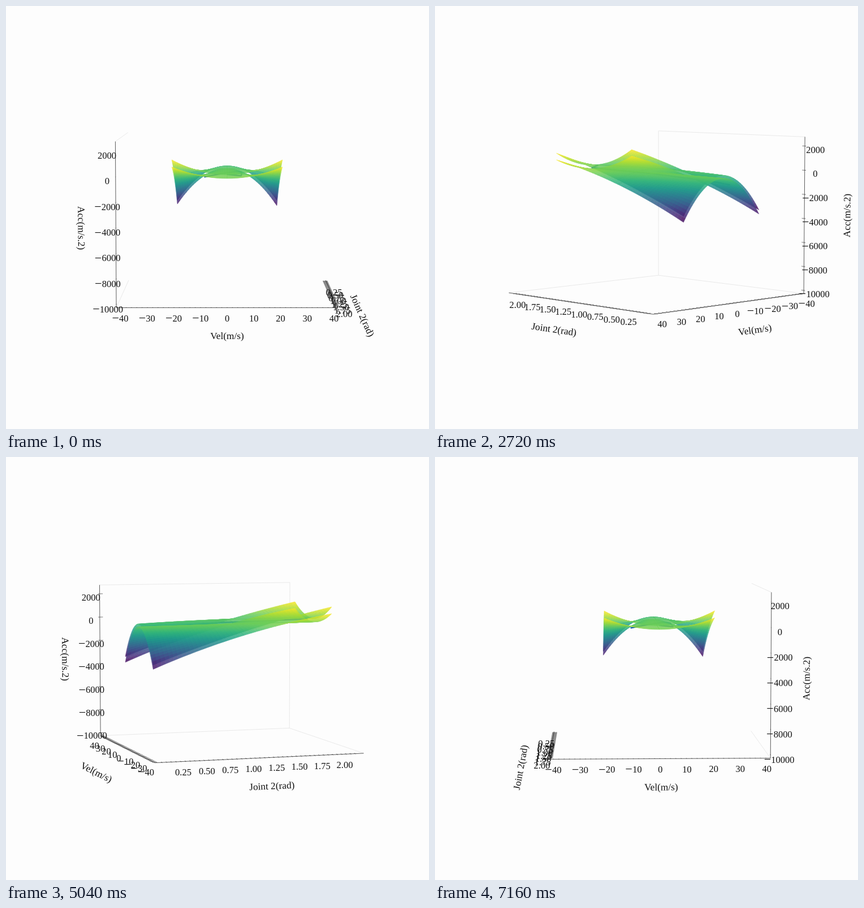
Animation of 748x748 px, one loop 7200 ms. Source, as an HTML page with a canvas:

```html
<!DOCTYPE html>
<html lang="en">
<head>
<meta charset="utf-8">
<title>Rotating acceleration surface</title>
<style>
  html, body { margin: 0; width: 100%; height: 100%; overflow: hidden; background: #fdfdfd; }
  canvas { display: block; width: 748px; height: 748px; }
</style>
</head>
<body>
<canvas id="stage" width="748" height="748"></canvas>
<script>
const SIZE = 748, STEP_MS = 40, STEPS = 180;
const BOX = 0.5952, BOX_Z = 0.4464;          // half sizes of the axes box
const V_MAX = 20.8, J_MIN = 0.12, J_MAX = 2.1;
const FONT = '"Liberation Serif", "Noto Serif", serif';
const stage = document.getElementById('stage').getContext('2d');
const layer = document.createElement('canvas');
layer.width = layer.height = SIZE;
const patchCtx = layer.getContext('2d');

// Data to box coordinates
const joint = q => (q - 1.11) / 2.18 * 1.1429;
const vel = v => v / 80 * 1.1429;
const acc = a => (a + 3750) / 12500 * 0.8571;

// Camera orbiting at 5 degrees elevation
const ELEV = Math.PI / 36, sinE = Math.sin(ELEV), cosE = Math.cos(ELEV);
let sinA = 0, cosA = 1;
function project([x, y, z]) {
  const toward = cosA * x + sinA * y;
  const depth = 10 - cosE * toward - sinE * z;
  const k = 3110 / depth;
  return [391 + k * (cosA * y - sinA * x), 370 - k * (cosE * z - sinE * toward), depth];
}

function line(points, color, width) {
  stage.beginPath();
  for (const p of points) {
    const [x, y] = project(p);
    stage.lineTo(x, y);
  }
  stage.strokeStyle = color;
  stage.lineWidth = width;
  stage.stroke();
}

// Upper and lower acceleration limits
const part = q => (q - J_MIN) / (J_MAX - J_MIN);
const bend = (q, slope, curve) => -6.92 + (q - J_MIN) * (slope - curve * (q - 1.47));
function upper(q, v) {
  const p = part(q);
  return -100 + p * (705 - 495 * p) + bend(q, 5.126, 0.44) * v * v;
}
function lower(q, v) {
  const rest = 1 - part(q);
  return -190 - 140 * rest + bend(q, 5.126, 0.92) * (1 + 0.058 * rest) * v * v - 70 * rest * v / V_MAX;
}

const viridis = ['440154', '482878', '3e4989', '31688e', '26828e',
                 '1f9e89', '35b779', '6ece58', 'b5de2b', 'fde725']
  .map(h => [0, 2, 4].map(i => parseInt(h.substr(i, 2), 16)));
function shade(t) {
  const s = Math.min(Math.max(t, 0), 0.9999) * 9, i = Math.floor(s);
  return 'rgb(' + viridis[i].map((c, n) => Math.round(c + (viridis[i + 1][n] - c) * (s - i))) + ')';
}

// A sheet is split into four patches so that near parts cover far ones translucently
function makeSheet(f) {
  const n = 44, points = [], patches = [[], [], [], []];
  for (let i = 0; i <= n; i++) {
    for (let j = 0; j <= n; j++) {
      const q = J_MIN + (J_MAX - J_MIN) * i / n, v = V_MAX * (2 * j / n - 1);
      points.push([joint(q), vel(v), acc(f(q, v))]);
    }
  }
  const heights = points.map(p => p[2]);
  const low = Math.min(...heights), high = Math.max(...heights);
  for (let i = 0; i < n; i++) {
    for (let j = 0; j < n; j++) {
      const a = i * (n + 1) + j, ids = [a, a + 1, a + n + 2, a + n + 1];
      const mean = ids.reduce((sum, id) => sum + heights[id], 0) / 4;
      patches[(i < n / 2 ? 0 : 2) + (j < n / 2 ? 0 : 1)]
        .push({ ids, color: shade((mean - low) / (high - low)), depth: 0 });
    }
  }
  return { points, patches };
}
const sheets = [makeSheet(upper), makeSheet(lower)];

function drawPatch(cells, flat) {
  patchCtx.clearRect(0, 0, SIZE, SIZE);
  patchCtx.lineWidth = 0.6;
  for (const c of cells) {
    patchCtx.beginPath();
    for (const id of c.ids) patchCtx.lineTo(flat[id][0], flat[id][1]);
    patchCtx.closePath();
    patchCtx.fillStyle = patchCtx.strokeStyle = c.color;
    patchCtx.fill();
    patchCtx.stroke();
  }
  stage.globalAlpha = 0.85;
  stage.drawImage(layer, 0, 0);
  stage.globalAlpha = 1;
}

function drawSheet({ points, patches }) {
  const flat = points.map(project);
  for (const cells of patches) {
    for (const c of cells) c.depth = c.ids.reduce((sum, id) => sum + flat[id][2], 0);
    cells.sort((a, b) => b.depth - a.depth);
  }
  patches.sort((a, b) => b[0].depth - a[0].depth);
  for (const cells of patches) drawPatch(cells, flat);
}

const track = [[0.49, 0, 100], [0.46, 0.075, -40], [0.25, 0.08, -120], [0, 0.08, -180],
               [-0.25, 0.07, -350], [-0.45, 0.06, -512], [-0.45, -0.04, -730], [-0.45, -0.136, -994]]
  .map(([x, y, a]) => [x, y, acc(a)]);

function range(from, to, step) {
  const out = [];
  for (let i = 0; from + i * step <= to + 1e-9; i++) out.push(from + i * step);
  return out;
}

// along: axis index; tickDir: index of the tick direction
const axes = [
  { along: 0, tickDir: 1, map: joint, name: 'Joint 2(rad)', digits: 2,
    labels: range(0.25, 2, 0.25), ticks: range(0.05, 2.15, 0.05) },
  { along: 1, tickDir: 0, map: vel, name: 'Vel(m/s)', digits: 0,
    labels: range(-40, 40, 10), ticks: range(-40, 40, 2) },
  { along: 2, tickDir: 0, map: acc, name: 'Acc(m/s.2)', digits: 0,
    labels: range(-10000, 2000, 2000), ticks: range(-10000, 2000, 2000) }
];
const half = [BOX, BOX, BOX_Z];

function drawNumber(value, digits, x, y) {
  const text = Math.abs(value).toFixed(digits);
  stage.font = '16.5px ' + FONT;
  const width = stage.measureText(text).width, sign = value < 0 ? 12.6 : 0;
  const left = x - (width + sign) / 2;
  stage.textAlign = 'left';
  stage.textBaseline = 'alphabetic';
  stage.fillText(text, left + sign, y + 12);
  if (sign) {
    stage.font = '22px ' + FONT;
    stage.fillText('\u2212', left, y + 13.4);
  }
}

function drawAxis(axis, corner) {
  const { along, tickDir } = axis;
  // A point on the axis, pushed out of the box by a share of its size
  const at = (pos, out) => corner.map((s, i) => i === along ? pos : s * half[i] * (1 + out));
  const ends = [at(-half[along], 0), at(half[along], 0)];
  line(ends, '#333', 0.8);

  for (const value of axis.ticks) {
    const a = at(axis.map(value), 0), b = a.slice();
    a[tickDir] += corner[tickDir] * 0.0095;
    b[tickDir] -= corner[tickDir] * 0.019;
    line([a, b], '#222', 0.6);
  }

  stage.fillStyle = '#111';
  for (const value of axis.labels) {
    const [x, y] = project(at(axis.map(value), 0.071));
    drawNumber(value, axis.digits, x, y);
  }

  const [p, q] = ends.map(project);
  let angle = Math.atan2(q[1] - p[1], q[0] - p[0]);
  if (angle > Math.PI / 2) angle -= Math.PI;
  if (angle < -Math.PI / 2) angle += Math.PI;
  const [x, y] = project(at(0, 0.292));
  stage.save();
  stage.translate(x, y);
  stage.rotate(angle);
  stage.font = '17.3px ' + FONT;
  stage.textAlign = 'center';
  stage.textBaseline = 'alphabetic';
  stage.fillText(axis.name, 0, 4.5);
  stage.restore();
}

function draw(step) {
  const azimuth = step * 2 * Math.PI / STEPS;
  sinA = Math.sin(azimuth);
  cosA = Math.cos(azimuth);
  const nearX = cosA >= 0 ? 1 : -1, nearY = sinA >= 0 ? 1 : -1;
  stage.fillStyle = '#fdfdfd';
  stage.fillRect(0, 0, SIZE, SIZE);
  stage.lineJoin = 'round';

  // Faint pane edges
  const corner = (x, y, z) => [x * BOX, y * BOX, z * BOX_Z];
  const edge = (a, b) => line([corner(...a), corner(...b)], '#e4e4e4', 0.8);
  for (const z of [-1, 1]) edge([-1, -nearY, z], [1, -nearY, z]);
  if (nearX < 0) {
    edge([1, -nearY, -1], [1, -nearY, 1]);
    edge([1, -1, -1], [1, 1, -1]);
  }

  drawAxis(axes[0], [0, nearY, -1]);
  drawAxis(axes[1], [nearX, 0, -1]);
  drawAxis(axes[2], [nearX, -nearY, 0]);

  line(track, '#0a5ea8', 2.5);
  sheets.forEach(drawSheet);
}

let shown = -1;
const start = performance.now();
function tick() {
  const step = Math.floor((performance.now() - start) / STEP_MS) % STEPS;
  if (step !== shown) draw(shown = step);
  requestAnimationFrame(tick);
}
tick();
</script>
</body>
</html>
```
